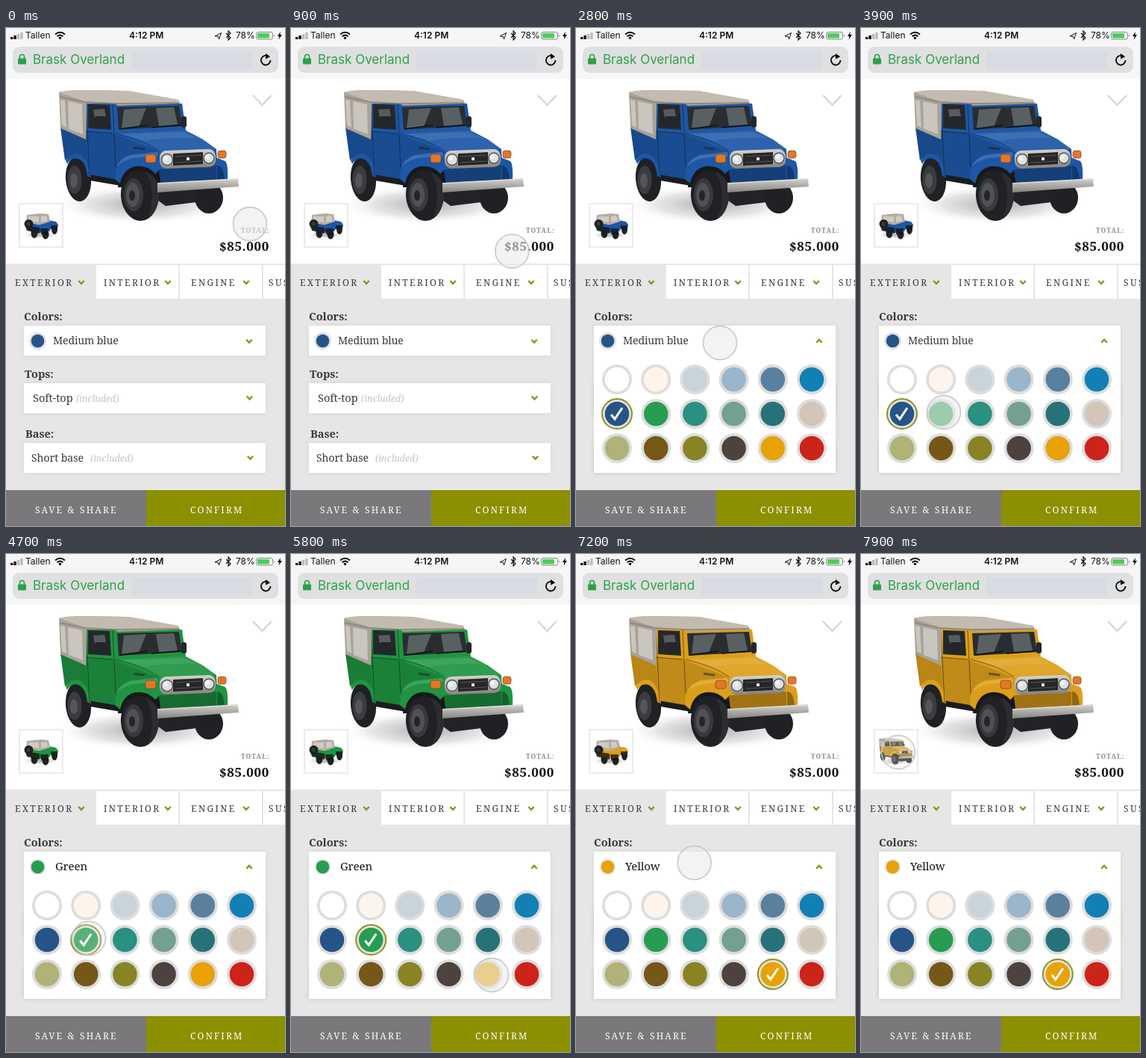
Animation of 374x666 px, one loop 8000 ms. Source, as an HTML page:

```html
<!DOCTYPE html>
<html lang="en">
<head>
<meta charset="utf-8">
<title>Car configurator</title>
<style>
  html, body { margin: 0; width: 100%; height: 100%; overflow: hidden; background: #e6e6e6; }
  svg { display: block; width: 374px; height: 666px; }
  text { font-family: "Noto Serif", serif; fill: #383838; font-size: 14px; white-space: pre; }
  .ui { font-family: Inter, Roboto, sans-serif; font-size: 12px; fill: #111; }
  .tab { font-size: 12px; letter-spacing: 2.4px; }
  .label { font-size: 14.5px; font-weight: 700; }
  .note { font-size: 12.4px; font-style: italic; fill: #c2c2c2; }
  .foot { font-size: 12px; letter-spacing: 2.2px; fill: #fff; }
  .box { fill: #fff; filter: drop-shadow(0 0 3px #00000012); }
  .arrow { fill: none; stroke: #8d9220; stroke-width: 2.4; }
  .body { fill: currentColor; }
  .tire { fill: #202124; }
</style>
</head>
<body>
<svg viewBox="0 0 374 666" xmlns="http://www.w3.org/2000/svg">
  <defs>
    <radialGradient id="ground">
      <stop offset="0" stop-color="#888" stop-opacity=".7"/>
      <stop offset=".6" stop-color="#bbb" stop-opacity=".4"/>
      <stop offset="1" stop-color="#fff" stop-opacity="0"/>
    </radialGradient>
    <linearGradient id="chrome" x2="0" y2="1">
      <stop offset="0" stop-color="#d5d3cf"/><stop offset="1" stop-color="#85847f"/>
    </linearGradient>
    <clipPath id="panelClip"><rect id="panelMask" x="24" y="398" width="324" height="40"/></clipPath>

    <g id="carFront">
      <ellipse cx="182" cy="236" rx="118" ry="27" fill="url(#ground)"/>
      <path d="M104 192L155 200L200 228L214 238L255 233L284 203L200 188Z" fill="#222326"/>
      <g class="tire">
        <ellipse cx="272" cy="227" rx="19" ry="21"/>
        <ellipse cx="97" cy="202" rx="17" ry="30" transform="rotate(-5 97 202)"/>
      </g>
      <ellipse cx="92" cy="203" rx="9.500" ry="19" fill="#3b3c3f"/>
      <ellipse cx="91" cy="204" rx="5" ry="10" fill="#55565a"/>

      <!-- body shell -->
      <path class="body" d="M73 133L107 147L108 99L143 101L236 101L241 137L264 149L282 162L284 204L206 208L198 188L152 206L112 200Q108 170 84 173L79 177Z"/>
      <path d="M73 133L107 147L112 200Q108 170 84 173L79 177Z" fill="#000" opacity=".16"/>
      <path d="M107 138L143 141L205 165L205 182L152 206L112 200Z" fill="#000" opacity=".13"/>
      <path d="M147 141L241 137L264 149L281 162L205 165Q180 149 147 141Z" fill="#fff" opacity=".07"/>
      <path d="M153 142L237 139L255 147Q210 146 185 151Z" fill="#fff" opacity=".08"/>
      <path d="M111 196L152 203L154 211L113 204Z" fill="#1b1c1e"/>
      <path d="M150 213Q150 183 176 182L204 184L208 214Z" fill="#17181a"/>

      <!-- fenders -->
      <path class="body" d="M146 202Q146 176 166 169L203 165L207 188L200 195Q190 183 174 185Q157 188 153 208Z"/>
      <path d="M148 186Q152 175 167 170L203 166L204 171L170 174Q156 177 148 186Z" fill="#fff" opacity=".14"/>
      <path class="body" d="M80 177Q88 165 99 169Q111 175 114 200L109 198Q107 179 97 175Q88 172 82 182Z"/>
      <path class="body" d="M281 173L294 178Q298 183 297 203L283 205Z"/>
      <path d="M283 184Q292 184 293 204L283 205Z" fill="#000" opacity=".35"/>
      <path d="M205 189L282 184V205L205 209Z" fill="#000" opacity=".28"/>
      <path d="M107 100L112 199M143 102L147 186M107 138L143 141M147 141Q183 149 205 164" fill="none" stroke="#111" stroke-opacity=".5"/>
      <path d="M171 160L186 162" stroke="#222" stroke-width="3" opacity=".55"/>

      <!-- windows -->
      <path d="M110 102L139 103L141 136L110 134Z" fill="#25282b"/>
      <path d="M117 109L132 108L137 133L121 132Z" fill="#565c5e"/>
      <path d="M149 106L232 104L236 131L151 136Z" fill="#292d30"/>
      <path d="M158 109L188 107L178 132L155 134ZM201 107L225 106L230 129L205 131Z" fill="#596062"/>
      <path d="M153 135L190 130M195 133L234 130" stroke="#111" stroke-width="1.500"/>

      <!-- canvas top -->
      <path d="M71 86Q80 83 104 83L164 84L231 96L233 101L150 104L146 101L108 101L107 149L73 134Z" fill="#aaa297"/>
      <path d="M71 86Q82 83 108 83L164 84L231 96L233 100L147 101L105 98Z" fill="#c3bbaf"/>
      <path d="M73 96L79 97L81 133L75 130ZM83 98L102 102L103 142L84 135Z" fill="#c9c5bf"/>
      <path d="M72 92L106 99L147 101L232 100" fill="none" stroke="#8b8378" stroke-width="1.300"/>
      <g fill="#24262a"><rect x="119" y="118" width="20" height="16" rx="3"/><rect x="235" y="118" width="7" height="15" rx="3"/></g>

      <!-- grille and lamps -->
      <rect x="206" y="163" width="75" height="24" rx="9" fill="url(#chrome)" transform="rotate(-2 243 175)"/>
      <path d="M224 168L264 166V182L224 184Z" fill="#272727"/>
      <path d="M227 172L262 170M227 180L262 178" stroke="#555"/>
      <rect x="242" y="173" width="4" height="4" fill="#ddd"/>
      <g fill="#dce2e4" stroke="#55575a" stroke-width="1.500"><circle cx="216" cy="176" r="7.500"/><circle cx="272" cy="174" r="7"/></g>
      <g fill="#f1f3f3"><circle cx="214" cy="174" r="3"/><circle cx="270" cy="172" r="3"/></g>
      <g fill="#e47725" stroke="#6b4630" stroke-width=".7"><rect x="187" y="169" width="14" height="11" rx="3"/><rect x="284" y="164" width="11" height="10" rx="3"/></g>

      <!-- front wheel and bumper -->
      <ellipse class="tire" cx="179" cy="224" rx="25" ry="34" transform="rotate(-5 179 224)"/>
      <path d="M187 192Q208 200 205 228Q202 248 190 254Q203 220 187 192Z" fill="#2c2d30"/>
      <ellipse cx="171" cy="223" rx="13" ry="22" fill="#38393c"/>
      <ellipse cx="170" cy="223" rx="9" ry="16" fill="#505156"/>
      <ellipse cx="169" cy="224" rx="4" ry="7" fill="#242528"/>
      <path d="M203 207L311 201L312 212L203 220Z" fill="url(#chrome)"/>
      <path d="M203 208L311 202" stroke="#e5e3df"/>
    </g>

    <g id="carRear">
      <ellipse cx="46" cy="277" rx="25" ry="5" fill="url(#ground)"/>
      <g class="tire"><ellipse cx="38" cy="274" rx="4.500" ry="7"/><ellipse cx="53" cy="276" rx="4.500" ry="6.500"/><ellipse cx="65" cy="269" rx="4" ry="7"/></g>
      <path class="body" d="M26 260L45 263L57 257L67 259L70 263L69 268L61 267L58 272L45 274L28 270Z"/>
      <path d="M26 264L45 267V275L28 271ZM46 268L57 268L56 276L47 276ZM60 264L69 264V268L60 269Z" fill="#151515" opacity=".8"/>
      <path d="M28 250L46 248L57 249L59 259L46 263L27 260Z" fill="#b5aca0"/>
      <path d="M30 252L44 252L44 260L30 258ZM47 252L54 251L56 258L47 260Z" fill="#d0cbc3"/>
      <circle class="tire" cx="30.500" cy="262" r="6"/><circle cx="30" cy="262" r="2.500" fill="#3a3a3a"/>
    </g>
  </defs>

  <rect width="374" height="666" fill="#e6e6e6"/>

  <!-- browser header -->
  <rect width="374" height="68" fill="#f6f6f6"/>
  <path d="M6 12h3.400v3H6zM10.400 10h3.400v5h-3.400z" fill="#111"/>
  <path d="M14.800 8h3.400v7h-3.400zM19.200 6h3.400v9h-3.400z" fill="#bbb"/>
  <text class="ui" x="26" y="14">Tallen</text>
  <path d="M66 8.500Q72.500 3 79 8.500M68.500 11.300Q72.500 8 76.500 11.300" fill="none" stroke="#111" stroke-width="2"/>
  <path d="M70.300 13Q72.500 11 74.700 13L72.500 15.500Z"/>
  <text class="ui" x="165" y="14" font-weight="600">4:12 PM</text>
  <path d="M280 11L288.500 6.500L285.500 15L284.300 11.200Z" fill="none" stroke="#111"/>
  <path d="M295 7L301 13L298 16V4L301 7L295 13" fill="none" stroke="#111" stroke-width="1.200"/>
  <text class="ui" x="308" y="14">78%</text>
  <rect x="335.500" y="5.500" width="22" height="9.500" rx="2.500" fill="none" stroke="#888"/>
  <rect x="337" y="7" width="16" height="6.500" rx="1" fill="#4cce5c"/>
  <path d="M359 8.500Q361 10 359 12Z" fill="#888"/>
  <path d="M368 5L364 11H366.500L365.500 15.500L370 9H367.300Z"/>
  <rect x="9" y="25" width="356" height="35" rx="9" fill="#dfe0e1"/>
  <rect x="168" y="31" width="162" height="24" fill="#d8dbe1"/>
  <rect x="16" y="40.500" width="11" height="8" rx="1" fill="#2ca148"/>
  <path d="M18.500 41V38.500a3 3 0 0 1 6 0V41" fill="none" stroke="#2ca148" stroke-width="1.700"/>
  <text class="ui" x="36" y="48" style="font-size:17px;fill:#2fa14b">Brask Overland</text>
  <path d="M352.500 38.500A6.300 6.300 0 1 0 354.500 43" fill="none" stroke="#111" stroke-width="1.900"/>
  <path d="M348 34L354 38.500L348 41.500Z"/>

  <!-- vehicle preview -->
  <rect y="68" width="374" height="247" fill="#fff"/>
  <path d="M331 90L343.500 103L356 90" fill="none" stroke="#d2d2d2" stroke-width="2"/>
  <g id="cars">
    <use href="#carFront"/>
    <rect x="18" y="235" width="58" height="58" fill="#fff" stroke="#ebebeb" stroke-width="2"/>
    <use id="thumbRear" href="#carRear"/>
    <use id="thumbFront" href="#carFront" transform="translate(10 230) scale(.2)"/>
  </g>
  <text x="315" y="274" style="font-size:8.500px;letter-spacing:1.200px;font-weight:700;fill:#8a8a8a">TOTAL:</text>
  <text x="286" y="298" style="font-size:17px;letter-spacing:.7px;font-weight:700;fill:#111">$85.000</text>

  <!-- tabs -->
  <path d="M121 317H231V362H121ZM233 317H343V362H233ZM345 317H374V362H345Z" fill="#fff"/>
  <text class="tab" x="12" y="345">EXTERIOR</text>
  <text class="tab" x="131" y="345">INTERIOR</text>
  <text class="tab" x="248" y="345">ENGINE</text>
  <text class="tab" x="352" y="345">SUS</text>

  <!-- options -->
  <text class="label" x="24" y="391">Colors:</text>
  <text class="label" x="25" y="468">Tops:</text>
  <text class="label" x="26" y="548">Base:</text>
  <rect class="box" x="24" y="475" width="324" height="40"/>
  <rect class="box" x="24" y="555" width="324" height="40"/>
  <text x="36" y="500" style="font-size:14.500px">Soft-top</text><text class="note" x="94" y="500">(included)</text>
  <text x="34" y="580">Short base</text><text class="note" x="113" y="580">(included)</text>
  <g id="arrows"></g>

  <rect id="panel" class="box" x="24" y="398" width="324" height="40"/>
  <circle id="chosenRing" cx="42.500" cy="418.500" fill="#dfe2e5"/>
  <circle id="chosenDot" cx="42.500" cy="418.500" r="8.800"/>
  <text id="chosenName" y="423"></text>
  <path id="panelArrow" class="arrow"/>
  <g clip-path="url(#panelClip)"><g id="swatches"></g></g>

  <!-- footer -->
  <rect y="618" width="188" height="48" fill="#7b787b"/>
  <rect x="188" y="618" width="186" height="48" fill="#8b9000"/>
  <text class="foot" x="39" y="649">SAVE &amp; SHARE</text>
  <text class="foot" x="247" y="649">CONFIRM</text>

  <circle id="cursor" r="22.500" fill="#ebebeb" stroke="#c6c6c6" stroke-opacity=".85" stroke-width="1.800"/>
</svg>
<script>
const LOOP = 8000;
const $ = id => document.getElementById(id);
const set = (el, attrs) => { for (const k in attrs) el.setAttribute(k, attrs[k]); };
const make = (parent, tag, attrs) => {
  const el = document.createElementNS("http://www.w3.org/2000/svg", tag);
  set(el, attrs);
  return parent.appendChild(el);
};
const mix = (a, b, p) => a + (b - a) * p;
const ramp = (t, start, end) => Math.min(1, Math.max(0, (t - start) / (end - start)));
const ease = p => p < .5 ? 4 * p ** 3 : 1 - (2 - 2 * p) ** 3 / 2;
const chevron = (x, y, h = 2) => `M${x - 3.7} ${y - h}L${x} ${y + h}L${x + 3.7} ${y - h}`;

const palette = ["#fff", "#fdf5eb", "#c8d4da", "#9bb5ca", "#5a809f", "#1280b5",
  "#265487", "#289c50", "#2a9080", "#74a18f", "#277278", "#d3c5b8",
  "#b0b278", "#755718", "#888424", "#4c423e", "#e8a208", "#cc2418"];
const choices = [
  { at: 0, swatch: 6, name: "Medium blue", x: 63, size: 14, ring: 11.5, ink: "#383838", paint: [29, 87, 166] },
  { at: 4250, swatch: 7, name: "Green", x: 66, size: 15, ring: 10.5, ink: "#111", paint: [31, 148, 66] },
  { at: 6200, swatch: 16, name: "Yellow", x: 66, size: 15, ring: 10.5, ink: "#111", paint: [220, 159, 27] }
];
const moves = [
  { start: 400, end: 1700, to: [193, 421] },
  { start: 2900, end: 3800, to: [111, 514] },
  { start: 5000, end: 5700, to: [269, 563] },
  { start: 6800, end: 7600, to: [50, 265] }
];
const presses = [[2000, 2300], [4100, 4900], [6050, 6700], [7680, 8000]];

for (const [x, y] of [[101, 340], [217, 340], [322, 340], [326.5, 494.5], [327.5, 574.5]])
  make($("arrows"), "path", { class: "arrow", d: chevron(x, y) });

const position = i => [55 + i % 6 * 52.2, 470 + Math.floor(i / 6) * 46];
const rings = palette.map((fill, i) => {
  const [cx, cy] = position(i);
  const ring = make($("swatches"), "circle", { cx, cy, r: 20 });
  make($("swatches"), "circle", { cx, cy, r: 16.3, fill });
  return ring;
});
const check = make($("swatches"), "path",
  { d: "M-8 1L-3 7L7 -8", fill: "none", stroke: "#fff", "stroke-width": 3 });

function drawCursor(t) {
  let pos = [327, 262];
  for (const m of moves) {
    const p = ease(ramp(t, m.start, m.end));
    pos = pos.map((v, i) => mix(v, m.to[i], p));
  }
  const press = Math.max(...presses.map(([a, b]) => Math.min(ramp(t, a, a + 120), 1 - ramp(t, b, b + 120))));
  set($("cursor"), { cx: pos[0], cy: pos[1], "fill-opacity": mix(.6, .25, press) });
}

function drawChoice(t) {
  const n = choices.findLastIndex(c => t >= c.at);
  const choice = choices[n];
  const before = choices[Math.max(0, n - 1)].paint;
  const fade = ramp(t, choice.at, choice.at + 220);
  $("cars").style.color = `rgb(${choice.paint.map((v, i) => Math.round(mix(before[i], v, fade)))})`;

  set($("chosenRing"), { r: choice.ring });
  set($("chosenDot"), { fill: palette[choice.swatch] });
  set($("chosenName"), { x: choice.x, style: `font-size:${choice.size}px;letter-spacing:-.1px;fill:${choice.ink}` });
  $("chosenName").textContent = choice.name;
  rings.forEach((ring, i) => set(ring, i === choice.swatch
    ? { fill: "#e3e3dc", stroke: "#8b9020", "stroke-width": 2 }
    : { fill: "#ddd", stroke: "none" }));
  set(check, { transform: `translate(${position(choice.swatch)})` });
}

function drawPanel(t) {
  const open = ease(ramp(t, 2250, 2650));
  const height = mix(40, 197, open);
  set($("panel"), { height });
  set($("panelMask"), { height });
  set($("swatches"), { opacity: ramp(t, 2450, 2800) });
  set($("panelArrow"), { d: chevron(326, 418.7, mix(2, -2, open)) });
}

function render(t) {
  drawPanel(t);
  drawChoice(t);
  drawCursor(t);
  const swap = ramp(t, 7700, 7880);
  set($("thumbRear"), { opacity: 1 - swap });
  set($("thumbFront"), { opacity: swap });
}

const began = performance.now();
function tick() {
  render((performance.now() - began) % LOOP);
  requestAnimationFrame(tick);
}
tick();
</script>
</body>
</html>
```
